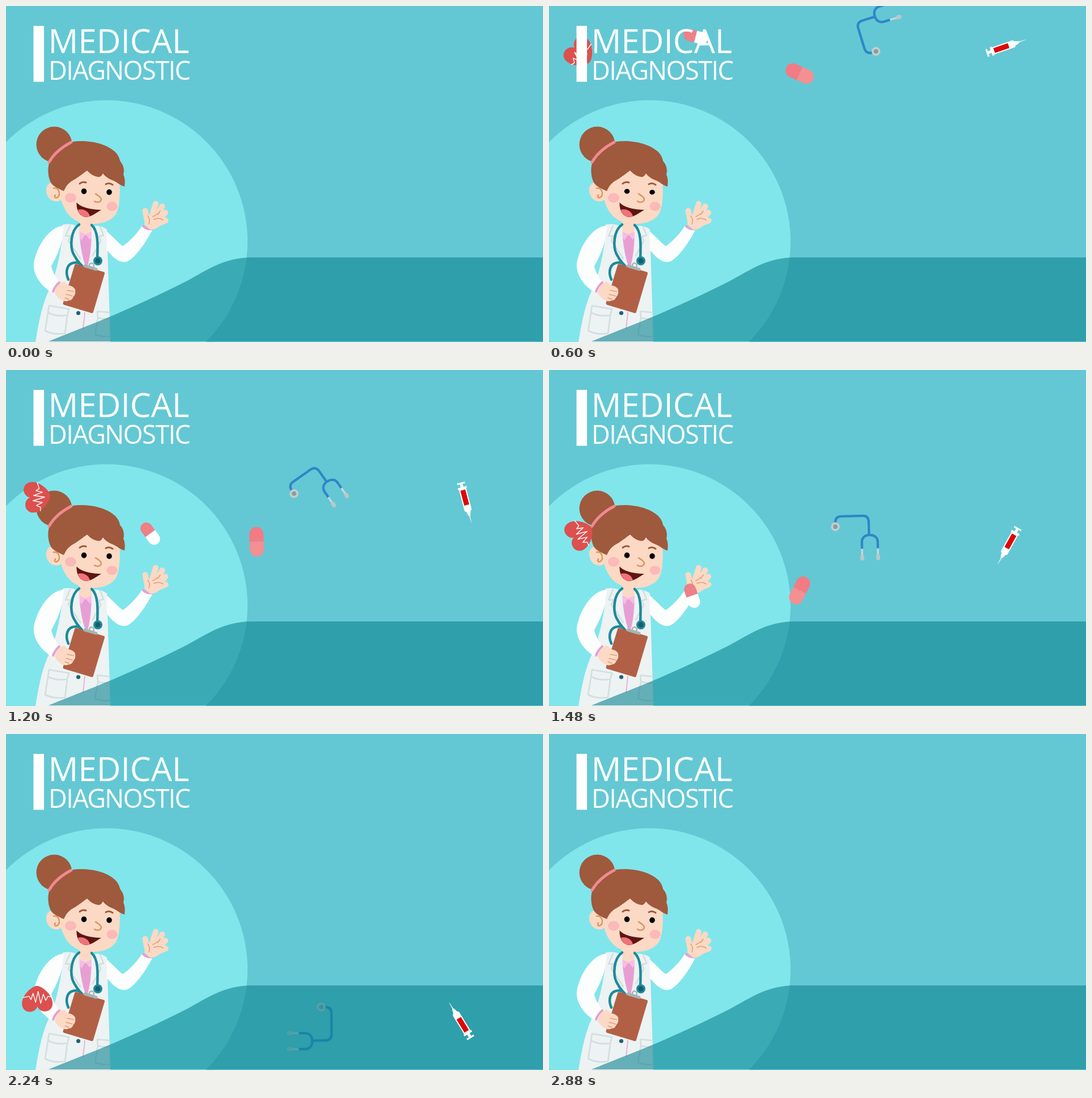
Recreate the animation shown at these times as an HTML page. Size 947 by 592 pixels, loop 3040 ms.

```html
<!DOCTYPE html>
<html lang="en">
<head>
<meta charset="utf-8">
<title>Medical diagnostic</title>
<style>
  html, body { margin: 0; width: 100%; height: 100%; overflow: hidden; background: #63c8d4; }
  svg { display: block; width: 947px; height: 592px; }
  text { font-family: "Open Sans", "Noto Sans", sans-serif; fill: #fff; }
  .line { fill: none; stroke-linecap: round; stroke-linejoin: round; }
  .skin { fill: #fcd9c4; }
  .hair { fill: #9f593c; }
  .crease { stroke: #d9985f; stroke-width: 2.6; }
  .fold { stroke: #dda078; stroke-width: 1.6; }
  .seam { stroke: #d3dedf; stroke-width: 2.6; }
  .cuff { stroke: #e79fd3; stroke-width: 4; }
  .tube { stroke: #1d8a9a; stroke-width: 4.5; }
</style>
</head>
<body>
<svg viewBox="0 0 947 592">
  <rect width="947" height="592" fill="#63c8d4"/>
  <circle cx="177" cy="415" r="249" fill="#80e6eb"/>

  <!-- doctor: body -->
  <g>
    <path class="skin" d="M129 376H151V402L140 412L129 402Z"/>
    <path fill="#e79fd3" d="M129 400L140 404L152 399L152 440L146 466L134 445Z"/>
    <path fill="#f6bde5" d="M129 397L140 402L133 413L128 405ZM152 397L140 402L148 412L153 404Z"/>
    <path fill="#edf2f3" d="M100 385C112 383 122 386 129 389C129 410 133 440 142 464C149 445 151 420 151 388C160 386 172 388 178 394L184 592H52C57 560 64 525 76 500C88 475 95 440 99 410Z"/>
    <path class="line seam" d="M113 387L105 405L114 405L110 413L131 445M166 389L172 404L164 406L167 414L153 440"/>
    <path class="line" stroke="#e7a9cf" stroke-width="1.6" d="M139 540L136 568"/>
    <path class="line seam" d="M76 528L111 534L108 545Q88 548 74 540ZM74 541L69 572Q84 580 104 577L108 546"/>
    <path class="line seam" d="M183 540L161 538L162 549Q172 553 183 551M162 550L157 579Q170 584 184 582"/>
    <circle cx="127.500" cy="541" r="3.600" fill="#1f6473"/>
  </g>

  <!-- waving arm -->
  <path fill="#fcfdfd" d="M177 397C188 405 199 419 206 423C219 414 232 400 240 387L258 395C248 414 229 443 214 450C200 455 188 442 178 430Z"/>
  <path class="line cuff" d="M242 388Q248 394 257 393"/>
  <path class="line" stroke="#fcd9c4" stroke-width="10" d="M250 383L245.500 361M256 375L264 348.500M263 375L275.500 353M268 378L281 364M267 384L281.500 378"/>
  <path class="skin" d="M244 385C244 374 252 366 260 366C270 366 277 372 276 380C274 388 263 395 254 394Z"/>
  <path class="line fold" d="M252 384C254 379 253 373 250 370M259 371Q264 369 267 366M261 376Q270 372 277 377M268 367L272 361"/>

  <!-- head -->
  <circle class="hair" cx="85" cy="244" r="31.500"/>
  <path class="skin" d="M98 313C82 305 69 313 71 327C73 342 88 350 100 340Z"/>
  <path class="line crease" d="M84 321C92 319 97 330 92 336C88 340 84 337 87 333"/>
  <path class="skin" d="M94 318C95 350 108 372 128 380C150 388 187 385 196 362C202 345 201 325 200 300L150 280L100 300Z"/>
  <path class="hair" d="M76 277Q92 248 118 239C150 234 197 246 201 273C208 281 209 290 207 297C210 303 210 311 209 318C203 317 198 312 190 308C182 305 174 300 171 295C168 300 166 302 162 301C154 300 148 295 143 290C137 294 130 300 122 305C112 310 107 315 102 326C92 322 82 317 79 311C74 301 73 288 76 277Z"/>
  <path class="line" stroke="#f08a90" stroke-width="5" d="M76 275Q88 254 115 240"/>
  <path class="line" stroke="#9f593c" stroke-width="3" d="M130 313Q135 309 141 311M176 314Q182 310.500 188 315"/>
  <ellipse cx="114" cy="338" rx="10" ry="8.500" fill="#fbb9b8"/>
  <ellipse cx="187" cy="353" rx="9.500" ry="8" fill="#fbb9b8"/>
  <ellipse class="eye" cx="137.500" cy="326.500" rx="4.800" ry="5"/>
  <ellipse class="eye" cx="182" cy="328" rx="4.800" ry="5"/>
  <path class="line crease" d="M158 331C162 334 168 336 168 341C167 346 160 347 156 344"/>
  <path fill="#5f1612" d="M124.500 346C131 354 148 359 168 359C160 364 151 371 142 372C129 371 124 359 124.500 346Z"/>
  <path fill="#f0737b" d="M126.500 359C135 356 146 361 148 370.500C141 374 130 371 126.500 359Z"/>

  <!-- neck stethoscope, clipboard, holding arm -->
  <path class="line tube" d="M129 385C113 396 113 425 119 437Q124 447 132 456M151 386C163 396 162 422 161 445M110 482C103 466 109 452 123 452Q130 452 134 458"/>
  <circle cx="162" cy="449" r="8" fill="#1d8a9a"/>
  <circle cx="162" cy="449" r="4.700" fill="#155f70"/>
  <path fill="#b26045" stroke="#b26045" stroke-width="5" stroke-linejoin="round" d="M123.500 457L171.500 471L151.500 538.500L103 524Z"/>
  <path class="line" stroke="#a7b3b5" stroke-width="5" d="M139 458L159 464"/>
  <circle cx="151" cy="457" r="4" fill="none" stroke="#a7b3b5" stroke-width="2.500"/>
  <path fill="#fcfdfd" d="M102 387C76 388 54 424 49 453C47 475 64 495 81 505L95 488C87 478 81 466 80 458C86 447 94 432 99 412Z"/>
  <path class="line cuff" d="M83 503Q86 494 94 487"/>
  <path class="skin" d="M86 506C88 494 95 486 103 486L110 492C116 493 123 497 122 502C123 507 121 510 119 512C117 517 114 519 110 519C104 523 93 517 86 506Z"/>
  <path class="line fold" d="M108 501L119 503M106 508L117 511M104 514L111 517"/>

  <g id="steth">
    <path class="line" stroke="#3086c7" stroke-width="4.300" d="M27 -35C35 -35 38.500 -31 38.500 -24V13Q38.500 24 27 24H4.500M-18 11H-8C0 11 4.500 17 4.500 25C4.500 33 0 39 -8 39H-18"/>
    <path class="line" stroke="#c8d6d8" stroke-width="3.500" d="M-21 11H-33M-21 39H-33"/>
    <path class="line" stroke="#b9c7ca" stroke-width="7" d="M-33.500 11H-37M-33.500 39H-37"/>
    <circle cx="20.500" cy="-35" r="7.700" fill="#c4cfce"/>
    <circle cx="20.500" cy="-35" r="4" fill="#8c9da0"/>
  </g>
  <g id="bigPill">
    <path fill="#f27b84" d="M0 -12.500H-13.500A12.500 12.500 0 0 0 -13.500 12.500H0Z"/>
    <path fill="#f48f92" d="M0 -12.500H13.500A12.500 12.500 0 0 1 13.500 12.500H0Z"/>
  </g>

  <path fill="#0d8491" fill-opacity=".6" d="M75 591C118 573 165 556 205 538C245 520 283 503 318 485C355 465 385 443 434 443H947V591Z"/>

  <g id="smallPill">
    <path fill="#ee8087" d="M0 -10.500H-11.500A10.500 10.500 0 0 0 -11.500 10.500H0Z"/>
    <path fill="#fff" d="M0 -10.500H11.500A10.500 10.500 0 0 1 11.500 10.500H0Z"/>
  </g>
  <g id="syringe">
    <g transform="translate(2 -5)" fill="#fff">
      <path d="M23 -1L36.500 -.3V.3L23 1Z" fill="#e6f4f6"/>
      <path d="M-24.500 -6.500H13Q15.500 -6.500 16 -4L24 -1.700V1.700L16 4Q15.500 6.500 13 6.500H-24.500Z"/>
      <path d="M-28 -8H-24.500V8H-28ZM-35 -2.500H-27V2.500H-35ZM-36.500 -7H-33.500V7H-36.500Z"/>
      <rect x="-22.500" y="-4.500" width="27" height="9" fill="#df0808"/>
    </g>
  </g>
  <g id="heart">
    <path fill="#dc504e" d="M0 23C-8 23 -27 8 -27 -8C-27 -19 -18 -24 -10 -22C-5 -21 -1 -17 0 -13C1 -17 5 -21 10 -22C18 -24 27 -19 27 -8C27 8 8 23 0 23Z"/>
    <path class="line" stroke="#fff" stroke-width="1.400" d="M-25 3L-19 4L-15 -3L-11 8L-6 -8L-2 13L3 -6L7 10L11 -1L14 5L25 3"/>
  </g>

  <rect x="48.500" y="35" width="18.500" height="98.500" fill="#fff"/>
  <text x="74.500" y="83" font-size="58.500">MEDICAL</text>
  <text x="75" y="130" font-size="45" letter-spacing="-1.600">DIAGNOSTIC</text>
</svg>
<script>
const LOOP = 3040, STEP = 40;
const FROM = 600, TO = 2240;

// Pose at FROM, then speeds in px and degrees per second; bend is a sideways ease-out
const falling = {
  heart: { x: 55, y: 83, turn: -47, vy: 234, spin: -82 },
  bigPill: { x: 442, y: 119, turn: 24, vy: 306, spin: 106 },
  smallPill: { x: 258.5, y: 54, turn: 15, vx: -7, vy: 390.5, spin: 64 },
  steth: { x: 535.5, y: 40.5, turn: -197, vy: 290, spin: 120, bend: 50.5 },
  syringe: { x: 806, y: 76.5, turn: -19, vy: 260.5, spin: 157 }
};

function place(id, { x, y, turn, vx = 0, vy, spin, bend = 0 }, t) {
  const s = (t - FROM) / 1000;
  const left = (TO - t) / (TO - FROM);
  const px = x + vx * s + bend * left ** 3;
  document.getElementById(id).setAttribute("transform",
    `translate(${px} ${y + vy * s}) rotate(${turn + spin * s})`);
}

function eyeOpening(t) {
  const p = Math.min(1, Math.max(0, (t - 520) / 600));
  return 1 - 0.9 * Math.sin(Math.PI * p) ** 2;
}

const eyes = document.querySelectorAll(".eye");

function draw(t) {
  for (const id in falling) place(id, falling[id], t);
  for (const eye of eyes) eye.setAttribute("ry", 5 * eyeOpening(t));
}

const start = performance.now();
function tick() {
  const t = (performance.now() - start) % LOOP;
  draw(Math.floor(t / STEP) * STEP);
  requestAnimationFrame(tick);
}
tick();
</script>
</body>
</html>
```
